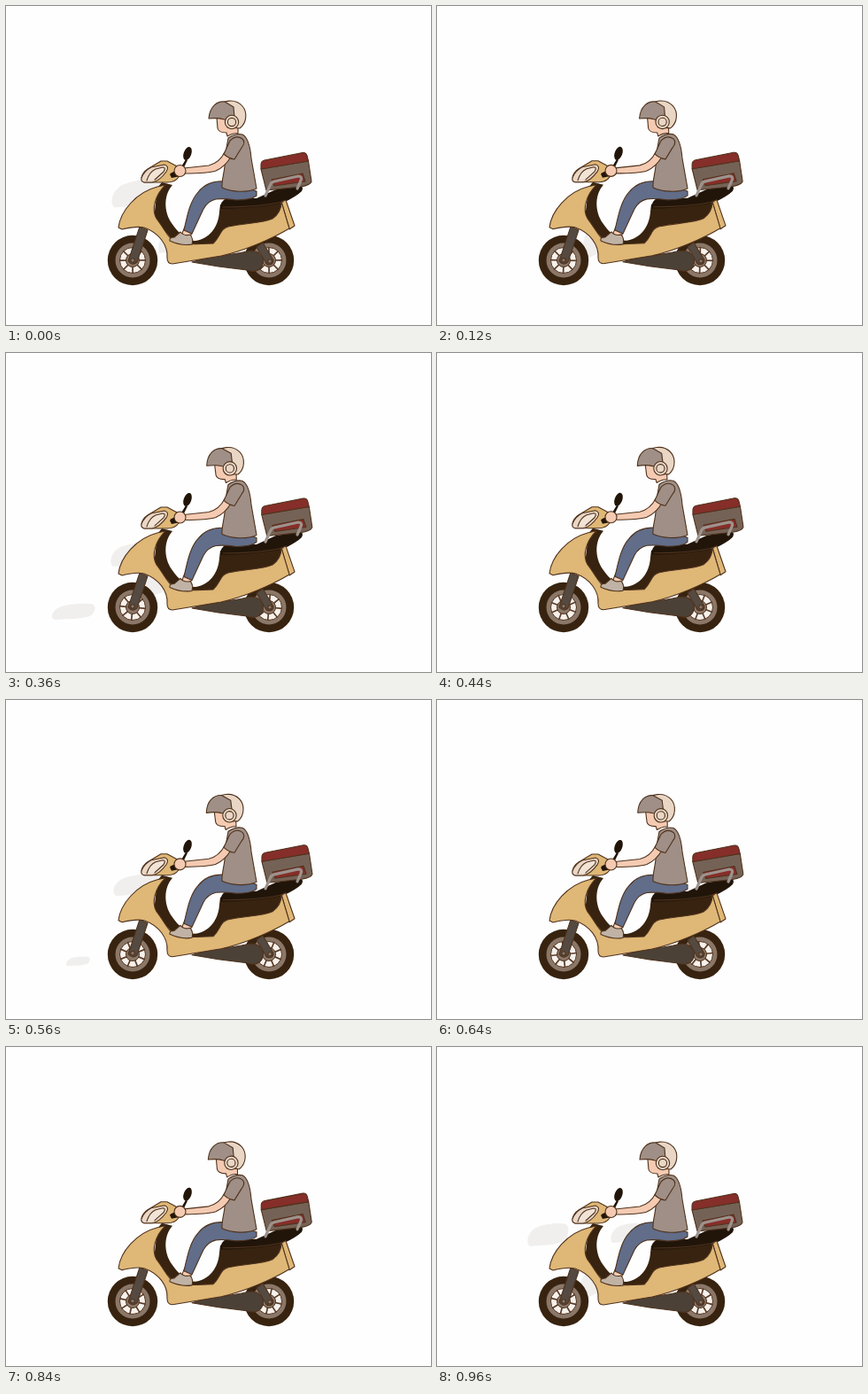
An HTML page that plays this animation: 480x360 px, repeating every 1 s.

```html
<!DOCTYPE html>
<html lang="en">
<head>
<meta charset="utf-8">
<title>Scooter ride</title>
<style>
  html, body { margin: 0; width: 100%; height: 100%; overflow: hidden; background: #fefefe; }
  svg { display: block; width: 100vw; height: 100vh; }
  .line { stroke: #4f321d; stroke-width: 1.1; stroke-linejoin: round; stroke-linecap: round; }
  .gold { fill: #dfb776; }
  .dark { fill: #21150a; }
  .brown { fill: #37230f; }
  .skin { fill: #f4cbb2; }
  .cloth { fill: #9f8f86; }
  .jeans { fill: #616d89; }
  .cream { fill: #e9d6c5; }
  .red { fill: #862e29; }
  .metal { fill: #544a41; }
  .none { fill: none; }
</style>
</head>
<body>
<svg viewBox="0 0 480 360">
  <defs>
    <g id="wheel">
      <circle r="28.2" fill="#37230f"/>
      <circle r="19.5" fill="#8b7768"/>
      <circle r="14.5" fill="#f6f1ec" stroke="#4f321d"/>
      <g class="spokes" stroke="#5a3c28" stroke-width="1.7"></g>
      <circle r="7.5" fill="#8b7768" stroke="#4f321d"/>
    </g>
    <path id="puff" d="M-.45 .48C-.56 .3-.48-.1-.32-.28C-.15-.46 .25-.55 .43-.45C.54-.35 .5 .1 .36 .28C.15 .45-.2 .44-.45 .48Z"/>
  </defs>

  <g id="air" fill="#f0efee"></g>

  <use href="#wheel" x="143" y="287"/>
  <use href="#wheel" x="297" y="287"/>

  <g id="scooter">
    <path class="metal line" d="M283 272L290 267L302 287Q302 292 297 292Q294 292 293 289Z"/>
    <path class="metal line" d="M151 249L160 253L148 289Q143 294 138 288Z"/>
    <circle cx="143" cy="287" r="2.2" fill="#8b7768" class="line"/>
    <circle cx="298" cy="288" r="2.2" fill="#8b7768" class="line"/>
    <path class="line" fill="#4b4137" d="M210 289C230 282 255 281 272 277C285 274 292 283 290 291C288 299 280 301 272 298L240 294Z"/>

    <path class="brown" d="M171 205L176 199L188 202C178 213 178 232 187 245C195 257 205 265 214 265C229 263 240 250 241 232L242 224L313 221L310 238L270 252L240 272L195 272L167 240Z"/>
    <path class="dark" d="M242 229Q242 220 249 217L283 217L305 207L331 203Q337 203 334 209Q328 215 313 222Q285 228 242 229Z"/>
    <path class="gold line" d="M311 221L316 219L326 248L320 252Z"/>
    <path class="gold line" d="M127 250C129 232 147 210 171 204L180 202C168 214 164 230 170 240C180 253 183 262 191 267Q199 270 234 268C243 260 241 252 251 249C270 245 290 245 301 240Q311 233 311 221L320 251C300 263 270 276 243 282L188 291Q182 291 182 284C183 270 173 256 156 250C147 248 139 250 131 252Z"/>
    <path class="none line" d="M245 227Q285 227 313 221"/>

    <path class="dark" d="M194 188L203 173L205 174L197 190Z"/>
    <ellipse class="dark" cx="205" cy="166.5" rx="4.3" ry="7.8" transform="rotate(20 205 166.5)"/>
    <path class="gold line" d="M153 194Q154 188 160 184L175 175L182 175L195 182L195 193Q191 199 182 199L156 199Z"/>
    <path class="cream line" d="M153 194Q156 186 164 182L179 179Q185 181 181 187Q173 198 165 199L156 199Q152 198 153 194Z"/>
    <path class="line" fill="#f1e4d6" d="M159 197Q162 187 169 184L177 182Q181 182 178 187L168 196"/>
    <path class="dark" d="M185 190Q189 185 197 187L197 192L187 194Z"/>
  </g>

  <g id="cargo">
    <path class="line" fill="#756256" d="M288 184L341.500 175L345 198Q344 202 333 204L294 208Z"/>
    <path class="red line" d="M288 184L288 179Q288 175 292 174L335 165.500Q339 165 340 169L341.500 175Z"/>
    <path class="red line" d="M300 196L335 189L338 198L303 203Z"/>
  </g>
  <path id="rail" d="M293 214L298 203Q299 199 303 198L330 192Q335 192 333 197L329 206" fill="none" stroke="#9d938d" stroke-width="3.2" stroke-linecap="round"/>

  <g id="rider">
    <path class="skin line" d="M202 249L211 252L208 261L198 259Z"/>
    <path class="line" fill="#c0b3a6" d="M185 265Q184 261 190 261L197 255Q201 260 208 258Q212 263 210 269Q198 271 185 265Z"/>
    <path class="jeans line" d="M283 209L283 214Q277 219 260 219Q245 217 237 218Q228 220 223 229L210 257L201 253C205 235 208 220 217 210C225 200 236 197 248 198Z"/>
    <path class="cloth line" d="M251 149Q260 143 267 145C273 148 276 160 277 172L283 206C272 211 255 210 244 205C243 195 249 182 247 171Z"/>
    <path class="skin line" d="M247 165Q241 177 229 180L201 183L202 189Q228 189 237 186Q248 181 254 170Z"/>
    <circle class="skin line" cx="196.500" cy="186" r="6.500"/>
    <path class="cloth line" d="M246 167L253 152Q260 145 267 150Q271 154 266 160L258 173Q251 172 246 167Z"/>
  </g>

  <g id="head">
    <path class="skin line" d="M238 126L239 138Q240 143 249 143L250 147Q257 143 262 144L262 130Z"/>
    <path class="cream line" d="M239 114C244 106 259 104 267 113C273 120 272 132 264 138L250 137L249 127Z"/>
    <path class="cloth line" d="M229 127C230 113 239 107 247 108L257 114L258 126Q253 130 246 128Q240 126 229 127Z"/>
    <circle class="cream line" cx="255" cy="131" r="7.700"/>
    <circle class="cream line" cx="255" cy="131" r="4.600"/>
  </g>
</svg>

<script>
const LOOP = 1000;
const NS = "http://www.w3.org/2000/svg";
const $ = id => document.getElementById(id);

// Each puff: peak time, x, y, width, height, time visible either side, drift in px/ms
const puffs = [
  [1000, 147, 212, 56, 32, 70, 0.55],
  [960, 216, 210, 40, 23, 70, 0.4],
  [960, 172, 268, 22, 32, 60, 0.2],
  [240, 166, 240, 48, 46, 60, 0.4],
  [360, 141, 228, 46, 27, 70, 0.4],
  [360, 168, 262, 24, 26, 60, 0.2],
  [360, 76, 292, 49, 19, 70, 0.4],
  [560, 147, 209, 52, 25, 70, 0.4],
  [560, 81, 295, 27, 11, 50, 0.4],
  [120, 174, 268, 20, 36, 60, 0.2]
];

const puffNodes = puffs.map(() => {
  const node = document.createElementNS(NS, "use");
  node.setAttribute("href", "#puff");
  return $("air").appendChild(node);
});

const SPOKES = 8;
const spokes = document.querySelector(".spokes");
for (let i = 0; i < SPOKES; i++) {
  const spoke = document.createElementNS(NS, "path");
  spoke.setAttribute("d", "M0 0V-15");
  spoke.setAttribute("transform", `rotate(${i * 360 / SPOKES})`);
  spokes.appendChild(spoke);
}

const place = (id, value) => $(id).setAttribute("transform", value);

function drawPuff(node, [peak, x, y, w, h, span, speed], ms) {
  const dt = (ms - peak + 1.5 * LOOP) % LOOP - LOOP / 2;
  const size = Math.sqrt(Math.max(0, 1 - (dt / span) ** 2));
  node.setAttribute("visibility", size > 0.05 ? "visible" : "hidden");
  node.setAttribute("transform", `translate(${x + dt * speed} ${y}) scale(${w * size} ${h * size})`);
}

function draw(ms) {
  const lift = (1 - Math.cos(2 * Math.PI * ms / LOOP)) / 2;
  place("scooter", `translate(0 ${-1.3 * lift})`);
  place("rider", `translate(0 ${-0.7 * lift})`);
  place("cargo", `translate(${lift} ${-1.8 * lift})`);
  place("rail", `translate(0 ${-1.2 * lift})`);
  place("head", `translate(${-2 * lift} ${-0.8 * lift}) rotate(${-2.5 * lift} 255 146)`);
  spokes.setAttribute("transform", `rotate(${-360 * ms / LOOP})`);
  puffNodes.forEach((node, i) => drawPuff(node, puffs[i], ms));
}

const start = performance.now();
function tick() {
  draw((performance.now() - start) % LOOP);
  requestAnimationFrame(tick);
}
tick();
</script>
</body>
</html>
```
